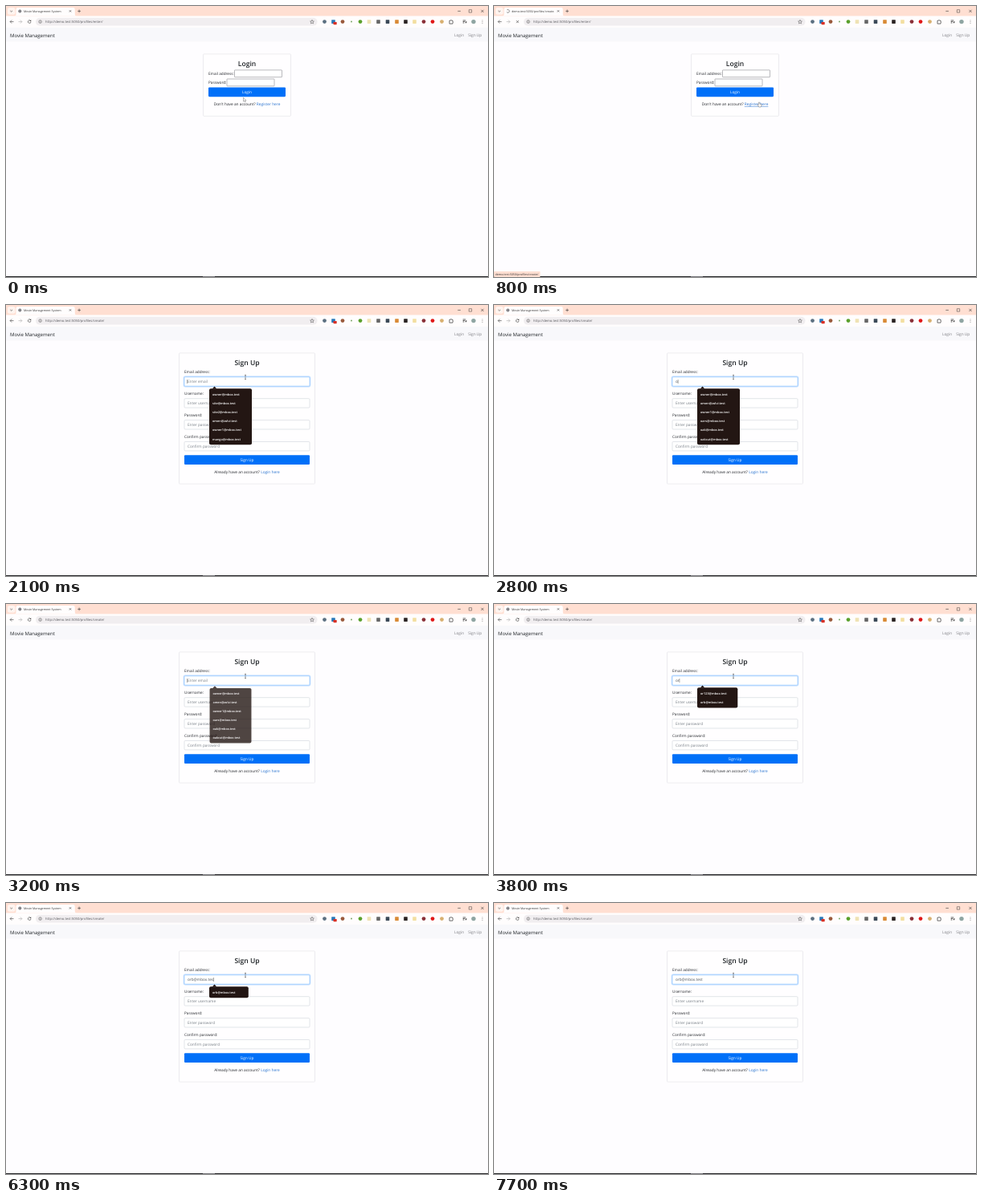
These frames come from a looping animation (600 by 338 pixels, 8 s). An HTML page:

```html
<!DOCTYPE html>
<html lang="en">
<head>
<meta charset="utf-8">
<title>Sign-up form</title>
<style>
  html, body { margin: 0; width: 100%; height: 100%; overflow: hidden; background: #fefdff; }
  svg { display: block; width: 100vw; height: 100vh; }
  text { font-family: "Open Sans", "Noto Sans", sans-serif; text-rendering: geometricPrecision; white-space: pre; }
</style>
</head>
<body>
<svg id="stage" viewBox="0 0 600 338"></svg>
<script>
const LOOP = 8000;
const INK = '#212529', BLUE = '#0070f8', PEACH = '#ffdfd2';
const HOST = 'demo.test:5050/profiles/';

// Drawing helpers returning SVG markup
const text = (x, y, size, fill, str, extra = '') =>
  `<text x="${x}" y="${y}" font-size="${size}" fill="${fill}" ${extra}>${str}</text>`;
const middle = (y, size, fill, str, extra = '') => text(300, y, size, fill, str, 'text-anchor="middle" ' + extra);
const box = (x, y, w, h, fill, r = 0, stroke = 'none', extra = '') =>
  `<rect x="${x}" y="${y}" width="${w}" height="${h}" rx="${r}" fill="${fill}" stroke="${stroke}" stroke-width=".6" ${extra}/>`;
const line = (d, color = '#333', width = .6, extra = '') =>
  `<path d="${d}" fill="none" stroke="${color}" stroke-width="${width}" ${extra}/>`;
const dot = (x, y, r, fill) => `<circle cx="${x}" cy="${y}" r="${r}" fill="${fill}"/>`;
const cross = (x, y, r, width) => line(`M${x - r} ${y - r}l${2 * r} ${2 * r}m0 ${-2 * r}l${-2 * r} ${2 * r}`, '#333', width);

const extensions = [
  [396.5, '#5b6f80', 1], [407.5, '#2878b8', 0], [419, '#9a5a3c', 1], [441, '#5aa02c', 1],
  [452, '#efe3b4', 0], [463.5, '#666', 0], [475, '#3c4a58', 0], [486.5, '#d98a35', 0],
  [497.5, '#2a2322', 0], [508.5, '#f3dfa0', 0], [520, '#8a3038', 1], [531, '#e01818', 1], [542.5, '#d8b070', 1]
].map(([x, color, round]) => round ? dot(x, 19.6, 2.4, color) : box(x - 2.3, 17.3, 4.6, 4.6, color, .4)).join('');

const browser = `
  ${box(0, 0, 600, 12.8, PEACH)}
  ${box(0, 12.5, 600, 14.3, '#fffdfd')}
  ${box(2, 2, 9.5, 8.8, '#fff4ef', 2.5)}${line('M5.2 5.8l1.4 1.4 1.4-1.4')}
  <path d="M10.5 12.6q2 0 2-2V4.3q0-2.2 2.2-2.2H83.6q2.2 0 2.2 2.2v6.3q0 2 2 2z" fill="#fffdfd"/>
  ${cross(80, 6.4, 1.1, .6)}${line('M89.2 6.4h3.8m-1.9-1.9v3.8')}
  ${line('M562.3 6.4h3.6')}${line('M576.3 4.7h3.4v3.4h-3.4z', '#333', .5)}${cross(593, 6.4, 1.6, .6)}
  ${line('M9.5 19.6H5.2m1.9-2l-2 2 2 2')}${line('M15.5 19.6h4.3m-1.9-2l2 2-2 2', '#aaa')}
  ${box(37, 14.8, 350.5, 9.8, '#f1eef0', 4.9)}
  <circle cx="42.6" cy="19.6" r="1.8" fill="none" stroke="#444" stroke-width=".5"/>${line('M42.6 19.3v1.3m0-2.2v.4', '#444', .5)}
  ${line('M381 17.3l.7 1.6 1.7.2-1.3 1.1.4 1.7-1.5-.9-1.5.9.4-1.7-1.3-1.1 1.7-.2z', '#444', .5)}
  ${extensions}${box(407.5, 20, 4.2, 3.2, '#d93025', .6)}${dot(430, 19.6, 1, '#7ca86a')}
  ${line('M552 18.2h1.4q.6-1.6 1.2 0h1.4v1.4q1.3.5 0 1v1.5h-4z', '#333', .7)}
  ${line('M568.7 18h3.6m-3.6 1.5h2.3m-2.3 1.5h1.8', '#222', .7)}<path d="M571.5 19.4h2.2l-1.1 2.4z" fill="#222"/>
  ${dot(582, 19.6, 2.7, '#8fa5a2')}
  ${dot(593, 17.9, .45, '#333')}${dot(593, 19.6, .45, '#333')}${dot(593, 21.3, .45, '#333')}
  <g id="globe">${dot(17.3, 6.4, 2, '#6b6b70')}${line('M15.5 5.8h3.6m-3.4 1.4h3.2', '#ddd', .4)}</g>
  ${line('M17.3 4.5a1.9 1.9 0 1 1-1.9 1.9', '#555', .6, 'id="spinner"')}
  <clipPath id="tabClip"><rect x="22" y="0" width="52.5" height="12"/></clipPath>
  ${text(22, 7.8, 3.64, '#333', '', 'id="tabTitle" clip-path="url(#tabClip)"')}
  ${text(49, 21.2, 4.15, '#55555a', '', 'id="address"')}
  <g id="reload">${line('M31 19.6a1.8 1.8 0 1 1-.6-1.4')}<path d="M31.2 17.2v1.8h-1.8z" fill="#333"/></g>
  <g id="stop">${cross(29.3, 19.6, 1.5, .6)}</g>
  ${box(0, 26.8, 600, 17.6, '#f8f8fb')}
  ${text(5, 38.5, 6.04, INK, 'Movie Management')}
  ${text(558, 38, 4.75, '#7d7d82', 'Login')}${text(575.2, 38, 4.8, '#7d7d82', 'Sign Up')}`;

const card = (x, w, h, title) =>
  box(x, 59.9, w, h, '#fffeff', 1, '#e0e0e4') + middle(75.2, 8.55, INK, title, 'font-weight="600"');
const button = (x, y, w, label) => box(x, y, w, 11.8, BLUE, 1.1) + middle(y + 7.6, 4.75, '#fff', label);
const footer = (y, question, link, id) =>
  middle(y, 4.8, INK, `${question} <tspan id="${id}" fill="#2a74cf">${link}</tspan>`);

const loginPage = `
  ${card(245.5, 109, 77.4, 'Login')}
  ${text(252, 86, 4.7, INK, 'Email address:')}${box(284.5, 79.9, 59, 8.8, '#fff', .4, '#8c8c90')}
  ${text(252, 97, 4.7, INK, 'Password:')}${box(275, 91, 59, 8.8, '#fff', .4, '#8c8c90')}
  ${button(252, 101.4, 96, 'Login')}
  ${footer(124.2, "Don't have an account?", 'Register here', 'register')}`;

const fields = [['Email address:', 'Enter email'], ['Username:', 'Enter username'],
  ['Password:', 'Enter password'], ['Confirm password:', 'Confirm password']];
const signupPage = card(215.5, 169, 163.2, 'Sign Up') +
  fields.map(([label, hint], i) => {
    const y = 26.9 * i;
    return text(222, 85.2 + y, 4.7, INK, label) +
      box(222, 89.8 + y, 156, 11.4, '#fff', 1.1, '#ced4da', i ? '' : 'id="emailBox"') +
      text(226, 97.3 + y, 4.7, '#757c84', hint, i ? '' : 'id="email"');
  }).join('') +
  button(222, 187.2, 156, 'Sign Up') + footer(209.8, 'Already have an account?', 'Login here', 'back') +
  box(221.2, 89, 157.6, 13, 'none', 1.7, '#007bff', 'id="ring" style="stroke-width:1;stroke-opacity:.25"') +
  box(0, 93, .4, 5, '#222', 0, 'none', 'id="caret"');

const stage = document.getElementById('stage');
stage.innerHTML = `
  ${box(0, 0, 600, 338, '#fefdff')}${browser}
  <g id="login">${loginPage}</g><g id="signup">${signupPage}</g>
  ${box(0, 337, 600, 1, '#26262a')}${box(245, 337, 15, 1, '#77777c')}
  <g id="status">${box(0, 331, 57.5, 7, PEACH, .8)}${text(1.5, 335.8, 3.65, '#333', HOST + 'create/')}</g>
  <g id="popup"></g>
  <path id="arrow" d="M0 0v4.8l1.2-1 .8 1.7.8-.4-.8-1.6h1.5z" fill="#fff" stroke="#666" stroke-width=".45"/>
  <path id="hand" d="M0 0q.8 0 .8.8v1.4l2 .5v2l-.7 1.3H-.3L-1.8 3.5l1-.2V.8Q-.8 0 0 0z" fill="#fff" stroke="#555" stroke-width=".45"/>
  ${line('M-1-2.6h2m-1 0v5.2m-1 0h2', '#333', .5, 'id="beam"')}`;

const el = {};
stage.querySelectorAll('[id]').forEach(node => el[node.id] = node);
const show = (id, on) => el[id].setAttribute('display', on ? 'inline' : 'none');
const place = (id, x, y) => el[id].setAttribute('transform', `translate(${x} ${y})`);

const mail = name => name + '@mbox.test';
const firstList = [...['owner', 'site', 'site2'].map(mail), 'omen@zolvi.test', ...['owner1', 'mango'].map(mail)];
const oList = [mail('owner'), 'omen@zolvi.test', ...['owner1', 'oars', 'oak', 'oakcut'].map(mail)];

const popups = [
  { from: 1900, to: 2400, width: 53, items: firstList, fadeIn: 200 },
  { from: 2400, to: 3400, width: 53, items: oList, fadeOut: 250 },
  { from: 3600, to: 3800, width: 53, items: oList },
  { from: 3800, to: 4300, width: 50.3, items: ['or123', 'orb'].map(mail) },
  { from: 4300, to: 6800, width: 48.8, items: [mail('orb')], fadeOut: 300 }
];

// Number of characters in the email field from each moment on
const ADDRESS = mail('orb');
const keys = [[2400, 1], [3150, 0], [3600, 1], [3800, 2], [4300, 3], [4500, 4], [4700, 5], [4850, 6],
  [4950, 7], [5100, 8], [5300, 9], [5600, 10], [5900, 11], [6200, 12], [6500, 13]];

const path = [[0, 295.5, 114.3], [300, 330, 120], [900, 330, 120], [1200, 322, 82.2],
  [1400, 320, 83], [1800, 298, 90], [LOOP, 298, 90]];

function pointer(t) {
  const i = path.findIndex(p => p[0] > t);
  const [t0, x0, y0] = path[i - 1], [t1, x1, y1] = path[i];
  const k = (t - t0) / (t1 - t0), e = k * k * (3 - 2 * k);
  return [x0 + (x1 - x0) * e, y0 + (y1 - y0) * e];
}

function drawPopup(t) {
  const p = popups.find(p => t >= p.from && t < p.to);
  show('popup', p);
  if (!p) return;
  const alpha = Math.min(1, p.fadeIn ? (t - p.from) / p.fadeIn : 1, p.fadeOut ? (p.to - t) / p.fadeOut : 1);
  const height = 3 + 11.2 * p.items.length;
  const scale = .9 + .1 * alpha, cx = 253 + p.width / 2, cy = 104 + height / 2;
  el.popup.setAttribute('opacity', alpha);
  el.popup.setAttribute('transform', `translate(${cx} ${cy}) scale(${scale}) translate(${-cx} ${-cy})`);
  el.popup.innerHTML = box(253, 104.2, p.width, height - .2, '#231613', 2) +
    '<path d="M256.7 104.4l2.8-2.9 2.8 2.9z" fill="#231613"/>' +
    p.items.map((item, i) => text(257, 112.6 + 11.2 * i, 3.85, '#fff', item, 'font-weight="600"')).join('');
}

function drawField(t) {
  const focused = t >= 1900;
  const count = keys.reduce((n, [at, length]) => t >= at ? length : n, 0);
  el.email.textContent = count ? ADDRESS.slice(0, count) : 'Enter email';
  el.email.setAttribute('fill', count ? '#495057' : '#757c84');
  el.emailBox.setAttribute('stroke', focused ? '#80bdff' : '#ced4da');
  show('ring', focused);
  show('caret', focused && t < 7200);
  el.caret.setAttribute('x', 226 + (count ? el.email.getComputedTextLength() : -.4));
}

function draw(t) {
  const signup = t >= 1000, loading = t >= 800 && t < 1500, hover = t >= 600 && t < 1000;
  show('login', !signup);
  show('signup', signup);
  show('status', t >= 600 && t < 1500);
  show('reload', !loading);
  show('stop', loading);
  show('globe', !loading);
  show('spinner', loading);
  el.spinner.setAttribute('transform', `rotate(${t * .4} 17.3 6.4)`);
  el.tabTitle.textContent = loading ? HOST + 'create/' : 'Movie Management System';
  el.address.textContent = 'http://' + HOST + (signup ? 'create/' : 'enter/');
  el.register.setAttribute('text-decoration', hover ? 'underline' : 'none');

  const shape = t >= 1750 ? 'beam' : hover && t < 950 ? 'hand' : 'arrow';
  for (const id of ['arrow', 'hand', 'beam']) show(id, id === shape);
  place(shape, ...pointer(t));
  drawField(t);
  drawPopup(t);
}

function frame() {
  draw(performance.now() % LOOP);
  requestAnimationFrame(frame);
}
frame();
</script>
</body>
</html>
```
